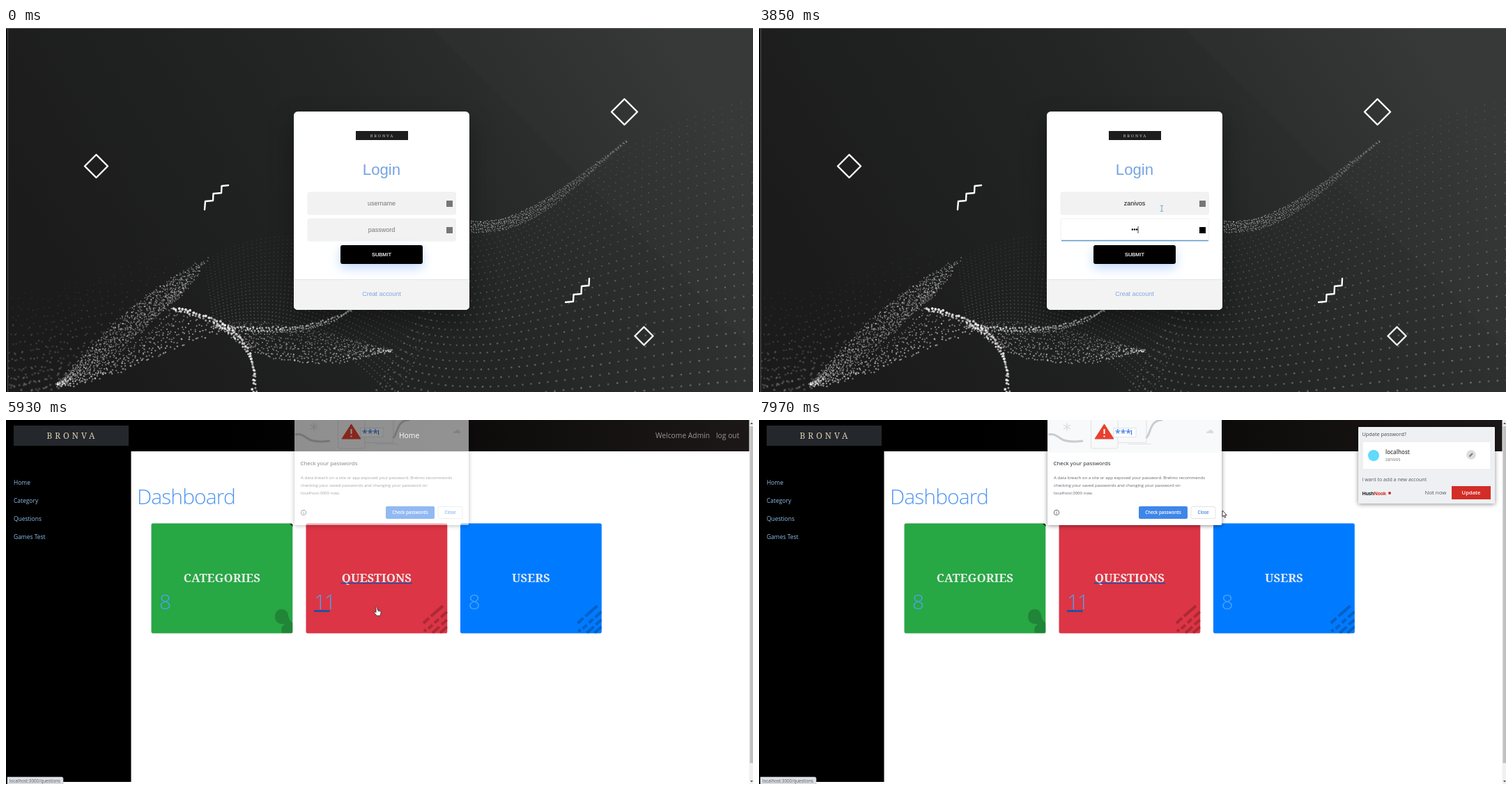
Recreate the animation shown at these times as an HTML page with a canvas. Size 1072 px wide and 523 px high, loop 8 s.

```html
<!DOCTYPE html>
<html lang="en">
<head>
<meta charset="utf-8">
<title>Login and dashboard</title>
<style>
  html, body { margin: 0; width: 100%; height: 100%; overflow: hidden; background: #fff; }
  canvas, svg { position: absolute; left: 0; top: 0; width: 1072px; height: 523px; display: block; }
  text { font-family: "Open Sans", "Noto Sans", sans-serif; white-space: pre; }
  #login text { font-family: "Liberation Sans", Arial, sans-serif; }
  #login .brand, .brand { font-family: "Noto Serif", serif; }
  .mid { text-anchor: middle; }
  .semi { font-weight: 600; }
  .light { font-weight: 300; }
  .slab { font-family: "Noto Serif", serif; font-weight: 700; }
  .raise { filter: drop-shadow(0 1px 3px rgba(0,0,0,.45)); }
</style>
</head>
<body>
<canvas id="wave" width="1072" height="523"></canvas>
<svg viewBox="0 0 1072 523">
  <defs>
    <linearGradient id="nav"><stop offset=".3" stop-color="#000"/><stop offset="1" stop-color="#1c1817"/></linearGradient>
    <pattern id="hatch" width="2" height="2" patternUnits="userSpaceOnUse">
      <rect width="2" height="2" fill="#fff" fill-opacity=".92"/><rect width="1" height="1" fill="#000" fill-opacity=".16"/>
    </pattern>
  </defs>

  <g id="login">
    <g fill="none" stroke="#fff" stroke-width="2.4" stroke-linejoin="round" stroke-linecap="round">
      <path d="M129.5 182l16.5 16.5-16.5 16.5-16.5-16.5zM887.500 102l18.500 18.500-18.500 18.500-18.500-18.500zM915.500 429.500l13 13-13 13-13-13z"/>
      <path d="M285 261l1-12 11-1 .5-10 11.500-1 .5-10 9.500-1M803 394l11-1 .5-10 11-1 .5-11 10.500-1 .5-10"/>
    </g>
    <rect x="413" y="120" width="252" height="285" rx="5.600" fill="#fff" style="filter:drop-shadow(0 15px 17px rgba(0,0,0,.35))"/>
    <path d="M413 361.500H665V399.400a5.600 5.600 0 0 1-5.600 5.600H418.600a5.600 5.600 0 0 1-5.600-5.600z" fill="#f3f3f3"/>
    <path d="M413 361.500H665" stroke="#e1e6ea"/>
    <rect x="502" y="148" width="75" height="13" fill="#1d1d1d"/>
    <text class="brand mid" x="540" y="156.500" font-size="5.800" letter-spacing="1.800" fill="#c4c4c4">BRONVA</text>
    <text class="mid" x="539" y="210.500" font-size="22.200" fill="#76a3e2">Login</text>
    <g id="fields"></g>
    <rect x="480" y="312" width="118" height="27" rx="3" style="filter:drop-shadow(0 6px 8px rgba(95,160,245,.4))"/>
    <text class="mid" x="539" y="327.700" font-size="7.400" fill="#fff" stroke="#fff" stroke-width=".2">SUBMIT</text>
    <text class="mid" x="539" y="385.300" font-size="8.900" fill="#7ba7df">Creat account</text>
  </g>

  <g id="dash">
    <rect width="1072" height="523" fill="#fff"/>
    <rect width="1067" height="45" fill="url(#nav)"/>
    <path d="M0 44H179.500V520H2V523H0z"/>
    <rect x="1066.500" width="5.500" height="523" fill="#f1f1f1"/>
    <rect x="1067.500" y="9" width="4.500" height="484" fill="#c1c1c1"/>
    <path d="M1068 6h4l-2-2.500zM1068 518h4l-2 2.500z" fill="#505050"/>
    <rect x="11" y="8" width="165" height="29" fill="#24272b"/>
    <text class="brand mid" x="95" y="26.500" font-size="12" letter-spacing="4" fill="#d8cfb4">BRONVA</text>
    <text x="564" y="26" font-size="10.300" fill="#fff">Home</text>
    <g font-size="10.300" fill="#989796"><text x="932" y="26">Welcome Admin</text><text x="1019" y="26">log out</text></g>
    <g font-size="8.450" fill="#8fbfec">
      <text x="11" y="93">Home</text><text x="11" y="119">Category</text>
      <text x="11" y="145">Questions</text><text x="11" y="170.500">Games Test</text>
    </g>
    <text class="light" x="188" y="121" font-size="30" letter-spacing="-.9" fill="#4f96f3">Dashboard</text>
    <g id="cards"></g>
    <g id="art" fill="#000" fill-opacity=".2">
      <path d="M407 149h2a2.500 2.500 0 0 1 2.500 2.500v1.500z" fill-opacity=".75"/>
      <path d="M386 282a9.500 9.500 0 0 1 19-1.500q1 8 6.500 11V306H396q-3-8 4-13-14 1-14-11z"/>
      <g id="rain" fill="none" stroke="#000" stroke-opacity=".22" stroke-width="4">
        <path d="M599 292l8-7.500m3-2.500l17-15M606 300l6-5.500m3-3l6-5.500m3-2.500l9-8M600 304l3-3m9 5l10-9m3-3l8-7M623 306l10-9"/>
      </g>
      <use href="#rain" x="221.500"/>
    </g>
    <g id="status">
      <path d="M2 513H80q2 0 2 2V523H2z" fill="#dee1e6" stroke="#b9bcc0" stroke-width=".6"/>
      <text x="5" y="520.700" font-size="6.250" fill="#55585c">localhost:3000/questions</text>
    </g>

    <g id="notice">
      <rect class="raise" x="414" y="-5" width="250" height="156" rx="1.500" fill="#fff"/>
      <rect x="414" width="250" height="47" fill="#f8f9fa"/>
      <g fill="none" stroke="#dadce0">
        <path d="M442 4.500v11M437 7l10 6M447 7l-10 6" stroke-width="1.300"/>
        <path d="M415 21q8-2 17 5t33 4" stroke="#c9ccd0" stroke-width="3"/>
        <path d="M555 26c8-4 4-26 24-26" stroke="#c9ccd0" stroke-width="3"/>
        <path d="M476.500 0V38q0 3 3 3H512q3 0 3-3V0M515 32.500H556V0M530 34.500H563" stroke-width=".8"/>
        <rect x="509" y="11.500" width="32" height="13" fill="#fff" stroke-width=".8"/>
      </g>
      <path d="M642 19q0-3 3-3 2-4 5-1 3 1 2 4z" fill="#dadce0"/>
      <path d="M495.500 6L509 27H482z" fill="#e8402f" stroke="#e8402f" stroke-linejoin="round"/>
      <path d="M495.500 13v7M495.500 22.500v2" stroke="#fff" stroke-width="2"/>
      <text class="semi" x="511" y="24" font-size="14" fill="#3f80e6">***</text>
      <path d="M534.500 14.500v7" stroke="#3f80e6" stroke-width="1.300"/>
      <text x="422.500" y="65.300" font-size="7.850" fill="#202124">Check your passwords</text>
      <g font-size="6.100" fill="#5f6368">
        <text x="423" y="85">A data breach on a site or app exposed your password. Brelmo recommends</text>
        <text x="423" y="96.200">checking your saved passwords and changing your password on</text>
        <text x="423" y="107.300">localhost:3000 now.</text>
      </g>
      <circle cx="427" cy="133" r="3.700" fill="none" stroke="#5f6368" stroke-width=".9"/>
      <path d="M427 132.500v2.500M427 130.600v1" stroke="#5f6368" stroke-width=".9"/>
      <rect id="check" x="545" y="124" width="70" height="18" rx="2"/>
      <rect x="620" y="124.500" width="35" height="17" rx="2" fill="#fff" stroke="#dadce0" stroke-width=".8"/>
      <g class="mid semi" font-size="6.200">
        <text x="580" y="135.200" fill="#fff">Check passwords</text><text x="637.500" y="135.200" fill="#3b82e6">Close</text>
      </g>
    </g>

    <g id="vault">
      <rect class="raise" x="860" y="10" width="196" height="110" rx="1" fill="#eef0f3"/>
      <g id="vaultBody">
        <text x="865.500" y="23.300" font-size="7.350" fill="#44484c">Update password?</text>
        <rect x="866" y="31" width="184" height="40" fill="#fff" stroke="#e2e4e7" stroke-width=".8"/>
        <circle cx="882" cy="51" r="8" fill="#61dafb"/>
        <text class="semi" x="899" y="49" font-size="8" fill="#3c4043">localhost</text>
        <text x="899" y="58.600" font-size="6.200" fill="#777">zanivos</text>
        <circle cx="1022" cy="50" r="6.800" fill="#dcdcdc"/>
        <path d="M1019.500 52.500l4.500-4.500" stroke="#777" stroke-width="2"/>
        <text x="865.500" y="88" font-size="7.100" fill="#55595d">I want to add a new account</text>
        <text x="865.500" y="107.600" font-size="7" font-weight="700" letter-spacing="-.3" fill="#222">Hush<tspan fill="#d32d27">Nook</tspan></text>
        <circle cx="905" cy="105" r="2" fill="#d32d27"/>
        <text x="955.500" y="107" font-size="7.800" fill="#55595d">Not now</text>
        <rect x="994" y="95" width="56" height="19" fill="#d32d27"/>
        <text class="mid semi" x="1022" y="107" font-size="7.600" fill="#fff">Update</text>
      </g>
    </g>
  </g>

  <g id="cursor" stroke-linejoin="round">
    <path id="arrow" d="M0 0V9L2 7.200 3.400 10.300 4.800 9.700 3.500 6.700H6.300Z" fill="#fff" stroke="#111" stroke-width=".8"/>
    <path id="hand" d="M-1 .8C-1-.3 1-.3 1 .8V4L5 5q1 0 1 1.500V9L5 12.300H0L-3.600 8C-4.200 6.400-2.800 6-1 7.800ZM2.500 4.500v2M4.200 5v1.800" fill="#fff" stroke="#222" stroke-width=".8"/>
    <path id="beam" d="M-2-4Q0-4 0-3 0-4 2-4M0-3V4M-2 4.500Q0 4.500 0 3.500 0 4.500 2 4.500" fill="none" stroke="#4d93bd" stroke-width=".8"/>
  </g>
</svg>
<script>
const LOOP = 8000;
const $ = id => document.getElementById(id);
const lerp = (a, b, k) => a + (b - a) * k;
const ramp = (t, from, to) => Math.min(1, Math.max(0, (t - from) / (to - from)));
const ease = k => k * k * (3 - 2 * k);
const show = (id, on) => { $(id).style.display = on ? "" : "none"; };

// Dotted backdrop: meshes of dots stretched between two Bezier curves.
let seed = 7;
const rand = () => (seed = (seed * 16807) % 2147483647) / 2147483647;

function bezier(p, t) {
  const s = 1 - t, w = [s * s * s, 3 * s * s * t, 3 * s * t * t, t * t * t];
  return [0, 1].map(i => w.reduce((sum, k, n) => sum + k * p[2 * n + i], 0));
}

function drawWave() {
  const c = $("wave").getContext("2d");
  const g = c.createLinearGradient(150, 500, 950, 0);
  g.addColorStop(0, "#1b1b1b");
  g.addColorStop(.5, "#232424");
  g.addColorStop(1, "#343736");
  c.fillStyle = g;
  c.fillRect(0, 0, 1072, 523);
  c.fillStyle = "rgba(255,255,255,.012)";
  c.beginPath();
  c.moveTo(610, 0); c.lineTo(1072, 0); c.lineTo(1072, 462);
  c.fill();

  function sheet(a, b, cols, rows, { size = [1, 1], alpha = [.4, .4], jitter = 0, power = 1, fade = 0 }) {
    for (let i = 0; i <= cols; i++) {
      const u = i / cols, p = bezier(a, u), q = bezier(b, u);
      for (let j = 0; j < rows; j++) {
        const v = rows > 1 ? j / (rows - 1) : 0, k = v ** power;
        const wobble = () => (rand() + rand() - 1) * jitter;
        c.fillStyle = `rgba(255,255,255,${lerp(...alpha, v) * (1 - fade * u) * lerp(.6, 1, rand())})`;
        c.beginPath();
        c.arc(lerp(p[0], q[0], k) + wobble(), lerp(p[1], q[1], k) + wobble(), lerp(...size, v), 0, 7);
        c.fill();
      }
    }
  }

  sheet([668, 290, 800, 275, 850, 150, 1085, 100], [520, 540, 640, 620, 900, 560, 1085, 560], 46, 30,
    { size: [.7, 1.6], alpha: [.2, .3], power: 1.15 });
  sheet([668, 278, 740, 284, 790, 235, 890, 163], [668, 293, 760, 296, 800, 240, 890, 163], 75, 6,
    { size: [.9, .9], alpha: [.65, .55], jitter: 1.6, fade: .65 });
  sheet([285, 335, 400, 260, 540, 330, 668, 290], [300, 430, 400, 400, 500, 460, 560, 540], 58, 24,
    { size: [.7, .9], alpha: [.14, .28] });
  sheet([0, 375, 80, 400, 150, 330, 290, 320], [0, 530, 20, 525, 50, 518, 80, 512], 26, 13,
    { size: [.9, 1.7], alpha: [.07, .24], jitter: 5 });
  sheet([75, 512, 130, 450, 200, 370, 290, 333], [75, 512, 170, 480, 215, 405, 250, 385], 75, 14,
    { size: [.9, 1], alpha: [.5, .4], jitter: 4 });
  sheet([75, 512, 170, 480, 225, 425, 240, 400], [75, 514, 150, 510, 230, 455, 320, 432], 50, 7,
    { size: [1, 1.2], alpha: [.45, .6], jitter: 4 });
  sheet([240, 403, 300, 410, 368, 440, 354, 523], [244, 406, 300, 418, 362, 445, 358, 523], 42, 2,
    { size: [1.9, 1.5], alpha: [.95, .8], jitter: 2 });
  sheet([298, 426, 380, 436, 440, 435, 494, 406], [300, 432, 380, 440, 450, 442, 490, 408], 48, 3,
    { size: [1.4, 1.1], alpha: [.85, .6], jitter: 2, fade: .3 });
  sheet([300, 428, 390, 415, 450, 440, 552, 463], [310, 430, 370, 492, 460, 490, 552, 463], 62, 10,
    { size: [.9, 1.1], alpha: [.4, .55], jitter: 3.5 });

  c.fillStyle = "#000";
  c.fillRect(0, 0, 2, 523);
  c.fillStyle = "#5c5c5c";
  c.fillRect(2, 0, 1, 523);
  c.fillRect(0, 0, 1072, 1);
}

const NAME = "zanivos";
const nameKeys = [1910, 2050, 2190, 2360, 2500, 2660, 2740];
const passKeys = [3540, 3680, 3850, 3990, 4070, 4220, 4310];
const typed = (keys, t) => keys.filter(k => t >= k).length;

function buildField(id, y) {
  $("fields").innerHTML += `
    <rect id="${id}Box" x="433" y="${y}" width="212.500" height="32" rx="2.800" stroke="#f0f0f0"/>
    <path id="${id}Line" d="M434 ${y + 31.500}H645" stroke="#5b9bd0" stroke-width="1.300"/>
    <text id="${id}Text" class="mid" x="539" y="${y + 19}" font-size="9"></text>
    <g id="${id}Dots"></g>
    <rect id="${id}Icon" x="632" y="${y + 12}" width="9" height="9"/>
    <path id="${id}Caret" d="M0 ${y + 11}v10" stroke="#111" stroke-width=".8"/>`;
}

function setField(id, focus, text, hint) {
  const shade = Math.round(lerp(242, 255, focus)), el = $(id + "Text");
  $(id + "Box").setAttribute("fill", `rgb(${shade},${shade},${shade})`);
  $(id + "Line").setAttribute("opacity", focus);
  el.textContent = text || hint;
  el.setAttribute("fill", text ? "#111" : "#757575");
  return text ? el.getComputedTextLength() : 0;
}

function setCaret(id, on, width) {
  show(id + "Caret", on);
  $(id + "Caret").setAttribute("transform", `translate(${539.3 + width / 2})`);
}

const cards = [
  { x: 208.5, title: "CATEGORIES", color: "#28a745", count: 8 },
  { x: 430.5, title: "QUESTIONS", color: "#dc3545", count: 11 },
  { x: 652, title: "USERS", color: "#007bff", count: 8 }
];

function buildCards() {
  $("cards").innerHTML = cards.map((c, i) => `
    <rect x="${c.x}" y="148.500" width="202.800" height="158" rx="2.500" fill="${c.color}"/>
    <text id="title${i}" class="mid" x="${c.x + 101.4}" y="232.600">${c.title}</text>
    <text id="count${i}" class="light" x="${c.x + 11.5}" y="271.500" font-size="30" letter-spacing="-2.500" fill="${i < 2 ? "#4fa3ee" : "#4da2ff"}"></text>`).join("")
    + `<g id="under" stroke="#0b55b0"><path id="underTitle" stroke-width="1.600"/><path id="underCount" stroke-width="2.600"/></g>`;
}

function setCards(t) {
  const ready = t >= 5330;
  cards.forEach((c, i) => {
    const title = $("title" + i);
    title.setAttribute("class", ready ? "mid slab" : "mid");
    title.setAttribute("font-size", ready ? 16.8 : 18.2);
    title.setAttribute("letter-spacing", ready ? 0 : .4);
    title.setAttribute("fill", ready ? "url(#hatch)" : "#fff");
    $("count" + i).textContent = ready ? c.count : 0;
  });
  $("underTitle").setAttribute("d", ready ? "M480.500 234.500H583" : "M478 234.500H586");
  $("underCount").setAttribute("d", ready ? "M442 274.500H464.500" : "M442 274.500H458");
  show("art", ready);
}

// Pointer path: time, x, y of the hot spot.
const path = [
  [70, 1003, 503], [130, 988, 494], [450, 988, 494], [570, 807, 381], [750, 807, 381], [880, 650, 302],
  [1060, 650, 302], [1250, 578, 259], [5780, 578, 259], [5900, 545, 267], [6050, 482, 276], [6330, 405, 277],
  [6480, 404, 277], [6590, 425, 262], [6730, 495, 218], [6950, 604, 130], [7100, 602, 170], [7220, 598, 165],
  [7360, 596, 133], [7500, 600, 132], [7820, 618, 132], [7910, 618, 132], [7970, 665, 130], [8000, 665, 130]
];

function pointer(t) {
  const i = Math.max(1, path.findIndex(p => p[0] > t));
  const a = path[i - 1], b = path[i], k = ramp(t, a[0], b[0]);
  return [lerp(a[1], b[1], k), lerp(a[2], b[2], k)];
}

function setCursor(t) {
  const [x, y] = pointer(t);
  const inField = t < 5150 && x > 433 && x < 645 && y > 236 && y < 268;
  const inCard = t >= 5240 && y > 152 && y < 306 && cards.some(c => x > c.x && x < c.x + 203);
  const kind = inField ? "beam" : inCard || (t >= 5150 && t < 5240) ? "hand" : "arrow";
  for (const id of ["arrow", "hand", "beam"]) show(id, id === kind);
  show("cursor", t >= 70);
  $("cursor").setAttribute("transform", `translate(${x} ${y})`);
  const over = t > 6900 && x > 545 && x < 615 && y > 124 && y < 142;
  $("check").setAttribute("fill", over ? "#5093ee" : "#3f86ea");
}

function render(t) {
  const inside = t >= 5240;
  show("login", !inside);
  show("dash", inside);
  show("wave", !inside);

  if (!inside) {
    const swap = ease(ramp(t, 2970, 3500));
    const width = setField("user", ease(ramp(t, 1380, 1830)) * (1 - swap), NAME.slice(0, typed(nameKeys, t)), "username");
    setCaret("user", t >= 1400 && t < 2970, width);

    const n = typed(passKeys, t);
    setField("pass", swap, n ? " " : "", "password");
    $("passDots").innerHTML = Array.from({ length: n }, (_, i) =>
      `<circle cx="${539 + (i - (n - 1) / 2) * 3.15}" cy="289.500" r="1.200"/>`).join("");
    setCaret("pass", t >= 2970 && t < 4830, n * 3.15);
    $("passIcon").setAttribute("fill", n ? "#000" : "#777");
  } else {
    setCards(t);
    const hover = t < 6590 || t >= 7100;
    show("under", hover);
    show("status", hover && t >= 5460);
    $("notice").setAttribute("opacity", ramp(t, 5840, 6000));
    const k = ramp(t, 6470, 7115);
    show("vault", k > 0);
    $("vault").setAttribute("transform", `translate(${-5 * (1 - k)})`);
    $("vaultBody").setAttribute("opacity", k);
  }
  setCursor(t);
}

drawWave();
buildField("user", 236);
buildField("pass", 274);
$("userIcon").setAttribute("fill", "#777");
buildCards();

const start = performance.now();
(function tick() {
  render((performance.now() - start) % LOOP);
  requestAnimationFrame(tick);
})();
</script>
</body>
</html>
```
